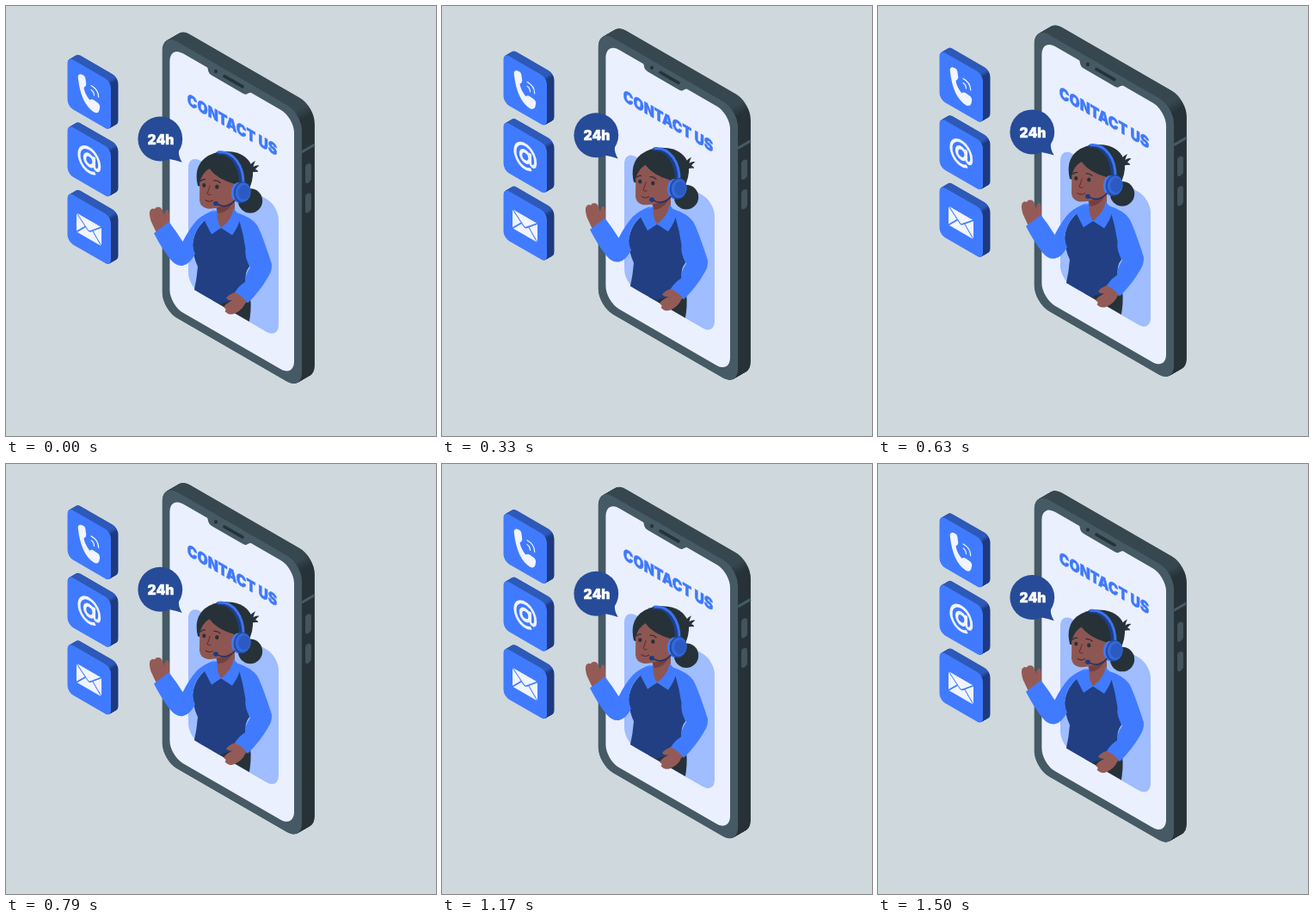
An HTML page with a canvas that plays this animation: 500 px wide and 500 px high, repeating every 1.54 s.

```html
<!DOCTYPE html>
<html lang="en">
<head>
<meta charset="utf-8">
<title>Contact us</title>
<style>
html, body { margin: 0; width: 100%; height: 100%; overflow: hidden; background: #cfd8dd; }
canvas { display: block; width: 500px; height: 500px; }
</style>
</head>
<body>
<canvas id="stage"></canvas>
<script>
const LOOP = 1540, STEPS = 37, LIFT = 10;
const BLUE = '#407bff', NAVY = '#213f82', DARK = '#263238', FRAME = '#455a64';
const SKIN = '#8e5652', HAND = '#945b56', SHADE = '#74403f', WHITE = '#f1f5ff';

const canvas = document.getElementById('stage');
const ctx = canvas.getContext('2d');
const dpr = window.devicePixelRatio || 1;
canvas.width = canvas.height = 500 * dpr;

function fill(d, color) {
  ctx.fillStyle = color;
  ctx.fill(new Path2D(d));
}

function line(d, color, width, cap = 'round') {
  ctx.strokeStyle = color;
  ctx.lineWidth = width;
  ctx.lineCap = cap;
  ctx.lineJoin = 'round';
  ctx.stroke(new Path2D(d));
}

function oval(x, y, rx, ry, color, turn = 0) {
  ctx.beginPath();
  ctx.ellipse(x, y, rx, ry, turn, 0, 7);
  ctx.fillStyle = color;
  ctx.fill();
}

function heavyText(text, x, y, size, color) {
  ctx.font = `900 ${size}px Inter, "Open Sans", sans-serif`;
  ctx.textAlign = 'center';
  ctx.textBaseline = 'alphabetic';
  ctx.fillStyle = ctx.strokeStyle = color;
  ctx.lineWidth = 0.5;
  ctx.lineJoin = 'round';
  ctx.fillText(text, x, y);
  ctx.strokeText(text, x, y);
}

// Runs draw() in the isometric wall plane whose origin is (x, y).
function onWall(x, y, draw) {
  ctx.save();
  ctx.transform(0.866, 0.5, 0, 1, x, y);
  draw();
  ctx.restore();
}

// The fill happens outside the plane so that gradients stay in stage space.
function wallRect(x, y, w, h, r, color) {
  onWall(x, y, () => {
    ctx.beginPath();
    ctx.roundRect(0, 0, w, h, r);
  });
  ctx.fillStyle = color;
  ctx.fill();
}

// Rounded plate extruded up and to the right; top and side meet at its corner.
function slab(x, y, w, h, r, depth, colors) {
  const u = w - 0.3 * r, cx = x + 0.866 * u, cy = y + 0.5 * u + 0.3 * r, b = r * 0.3;
  const shade = ctx.createLinearGradient(cx - b * 0.5, cy - b * 0.866, cx + b * 0.5, cy + b * 0.866);
  shade.addColorStop(0, colors.top);
  shade.addColorStop(1, colors.side);
  for (let d = depth; d > 0; d -= 0.5) wallRect(x + d, y - d * 0.58, w, h, r, shade);
  wallRect(x, y, w, h, r, colors.front);
}

function drawHandset() {
  fill('M83.7 83Q83.5 79 87 79.3L90 80.5Q92 81.5 92.3 84L93.3 91Q93.4 93.5 90.5 95Q91.5 102 97.3 109.3Q99.5 107.7 102 109.3L107.3 113Q109.3 115 109.2 117.5L108.4 121.5Q107 125.5 102.5 123.5Q87 114 83.7 83Z', WHITE);
  line('M99 97.5Q102.3 99.5 102.5 104', WHITE, 1.2);
  line('M99 92.5Q107.5 97 107.7 106', WHITE, 1.2);
}

function drawAt() {
  onWall(96.8, 179.3, () => {
    ctx.strokeStyle = WHITE;
    ctx.lineCap = 'butt';
    ctx.lineWidth = 3.5;
    ctx.beginPath();
    ctx.arc(0, 0, 13.7, 0.95, Math.PI * 2);
    ctx.bezierCurveTo(13.7, 8.5, 6.6, 8.5, 6.6, 3);
    ctx.lineTo(6.6, -7);
    ctx.stroke();
    ctx.lineWidth = 4;
    ctx.beginPath();
    ctx.arc(0, 0, 6.1, 0, 7);
    ctx.stroke();
  });
}

function drawEnvelope() {
  wallRect(82, 240.5, 33.5, 22, 1.5, WHITE);
  onWall(82, 240.5, () => line('M0 0L15 12.2Q16.7 13.6 18.5 12.2L33.5 0M0 22L12 10M33.5 22L21.5 10', BLUE, 1.4));
}

function drawTiles() {
  const colors = { front: BLUE, top: '#2d59b8', side: '#1d3a80' };
  for (let i = 0; i < 3; i++) slab(71.5, 58.8 + i * 78.6, 58.3, 57.7, 7.5, 8.5, colors);
  drawHandset();
  drawAt();
  drawEnvelope();
}

function drawPhone() {
  slab(181.7, 31.5, 187.5, 321.5, 20, 14.8, { front: FRAME, top: '#37474f', side: DARK });
  line('M344 169.7L358.8 161.2', FRAME, 3, 'butt');
  for (const y of [184, 218.5]) {
    fill(`M348 ${y + 3}Q348 ${y + 1} 351 ${y - 0.8}Q355 ${y - 2} 355 ${y + 2}V${y + 17}Q355 ${y + 19.5} 352 ${y + 21.5}Q348 ${y + 23.5} 348 ${y + 20}Z`, '#43545d');
  }
  wallRect(190.4, 46.2, 167, 301.6, 18, '#ebf0ff');
  fill('M234 70L235.3 76Q236 78.7 239.5 80.8L276 102Q279.5 103.7 281 101.7L286 100Z', FRAME);
  oval(244, 76, 2, 2.3, DARK);
  line('M254 81.6L275 93.7', DARK, 3.6);
}

function drawTitle() {
  onWall(263, 138, () => heavyText('CONTACT US', 0, 6.4, 18.1, '#3f79fa'));
}

function drawBody() {
  ctx.save();
  ctx.clip(new Path2D('M150 120H350V405.7L212 326Z'));
  fill('M240 337L284 339Q286 352 282 372L240 352Z', DARK);
  fill('M235 246Q219 258 217 277Q217 290 223 303Q222 317 218.5 332L250 347Q252 342 284 344L279 322Q277 310 283 303Q281 290 282 272L272 246Z', NAVY);
  ctx.restore();

  // Raised arm
  fill('M176 266L168.5 250Q165.5 240 168 237Q170 234.5 173 236Q174 233.5 177 233.7Q181 233.5 182.5 239.5L184 243.5Q185 236.5 187.5 237Q190 237.5 189.8 247L190 256Z', HAND);
  fill('M172 264.2L189.5 251Q198 262 205.5 274Q213 259 222 249Q230 241.5 243 237L235 246Q218 258 217.3 278Q218 285 220 288Q214 300 206 301.7Q198 303 191.5 295Q181 282 172 264.2Z', BLUE);

  // Lowered arm
  fill('M274 328L266 333Q258 336 256 340Q259 343 264 342Q253 347 253.5 351Q257 352 254.5 355Q260 361 267 357Q275 353 278 346L284 340Z', HAND);
  fill('M268 240Q286 246 292 255Q297 263 309 300Q309.5 307 306 313Q296 331 281 345.5Q275 337 266 333Q272 324 278 321Q278 312 284 304Q277 292 278.5 282Q276 265 271 248Z', BLUE);

  // Neck and collar
  fill('M244 229L266 223V240Q264 250 250 259Q244 252 245 238Z', SKIN);
  fill('M245 234L264 228Q258 241 245 241Z', SHADE);
  fill('M246 237Q237 240 231 250L239 265.5L250 258Q244 249 246 237Z', BLUE);
  fill('M264.5 235Q264 247 250 258L263 266.5Q270 257 273 246Z', BLUE);
}

function drawHead() {
  fill('M280 192Q283 183 290 180Q288 184 287.5 187Q291 184.5 294.5 185.5Q291 188 290 190Q293 190.5 293 193Q288 192 284 195Z', DARK);
  oval(284, 226.5, 14.2, 14.3, DARK);
  fill('M223 209Q218 188 231 177Q244 167 263 169.5Q283 173 287 190Q288 204 281 216L264 222L232 212Z', DARK);
  fill('M225.3 205Q228 194 236.5 189Q245 201 266 207V226Q248 237 234 235.5Q226 234 225 226Z', SKIN);

  oval(230.3, 208.5, 2.1, 2.4, DARK);
  oval(245.3, 210.2, 2.2, 2.5, DARK);
  line('M226.5 203.5Q228.5 201 231.5 201.8', DARK, 1.3);
  line('M242 203Q246 202.5 249 205.5', DARK, 1.3);
  line('M237 209Q236 214 234 218Q235.5 220 238 219.2', '#682f34', 1.1);
  line('M232 225.7Q236 228.7 240.5 226', '#5b282e', 1.1);
}

function drawHeadset() {
  line('M246.5 171C262 169.5 273 186 273 207', '#1e3e88', 4);
  line('M247.5 169.8C265 168.5 276.5 186 276 207', '#3c75f2', 3);
  oval(270.3, 217, 8.4, 11.8, BLUE);
  oval(274.6, 216.7, 10, 12.4, '#234a9e', 0.12);
  oval(275.6, 216.5, 9, 11, '#3469dc', 0.12);
  oval(277, 216.5, 6.8, 8.6, '#2b5bc2', 0.12);
  line('M266 226Q257 237 245 230', '#1d326a', 1.5);
  oval(244, 229.6, 2.9, 2.7, '#1d3b82');
}

function drawBubble() {
  oval(179.3, 154.5, 25.9, 26, '#264b98');
  fill('M201 168Q200 174 204.7 181.7Q197 179 190 178Z', '#264b98');
  heavyText('24h', 180, 160.7, 15.6, '#fff');
}

function draw(time) {
  const step = Math.floor(((time % LOOP) + 4) * STEPS / LOOP) % STEPS;
  const phase = (step + 1) / STEPS;
  const lift = LIFT * (1 - Math.abs(2 * phase - 1));
  ctx.setTransform(dpr, 0, 0, dpr, 0, 0);
  ctx.fillStyle = '#cfd8dd';
  ctx.fillRect(0, 0, 500, 500);
  ctx.translate(0, 0.54 - lift);
  drawTiles();
  drawPhone();
  drawTitle();
  wallRect(212, 171.8, 121.2, 154.5, 16, '#9fbdff');
  drawBody();
  drawHead();
  drawHeadset();
  drawBubble();
}

let start;
function tick(now) {
  start ??= now;
  draw(now - start);
  requestAnimationFrame(tick);
}
draw(0);
requestAnimationFrame(tick);
</script>
</body>
</html>
```
